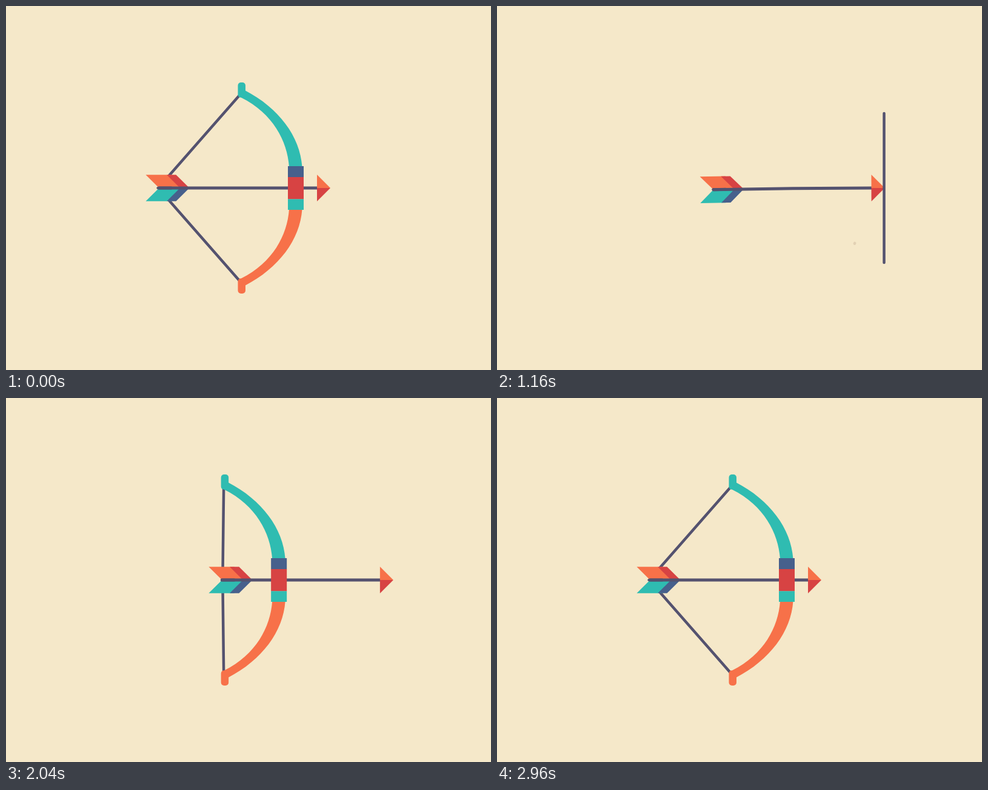
An HTML page with a canvas for the animation above (3 s loop, 800x600 px).

```html
<!DOCTYPE html>
<html lang="en">
<head>
<meta charset="utf-8">
<title>Bow and arrow</title>
<style>
html, body { margin: 0; width: 100%; height: 100%; overflow: hidden; background: #f5e8c9; }
canvas { display: block; }
</style>
</head>
<body>
<canvas id="stage" width="800" height="600"></canvas>
<script>
const ctx = document.getElementById('stage').getContext('2d');
const LOOP = 3000, MID = 300, IMPACT = 560, FLIGHT = 104.5;
const BG = '#f5e8c9', INK = '#54526f', TEAL = '#2fbcb1', ORANGE = '#f77149',
      RED = '#d74343', BLUE = '#47608c', SPARK = '#e2d1b4';

const clamp = v => Math.min(1, Math.max(0, v));
const ramp = (t, from, to) => clamp((t - from) / (to - from));

// Cubic bezier easing (.33, 0, .21, 1)
function ease(x) {
  let lo = 0, hi = 1;
  for (let i = 0; i < 24; i++) {
    const s = (lo + hi) / 2, r = 1 - s;
    if (3 * s * r * r * .33 + 3 * s * s * r * .21 + s * s * s < x) lo = s; else hi = s;
  }
  return lo * lo * (3 - 2 * lo);
}

function line(color, width, ...pts) {
  ctx.beginPath();
  pts.forEach(([x, y]) => ctx.lineTo(x, y));
  ctx.strokeStyle = color;
  ctx.lineWidth = width;
  ctx.lineCap = 'round';
  ctx.stroke();
}

function poly(color, ...pts) {
  ctx.beginPath();
  pts.forEach(([x, y]) => ctx.lineTo(x, y));
  ctx.fillStyle = color;
  ctx.fill();
}

function placed(x, y, angle, draw) {
  ctx.save();
  ctx.translate(x, y);
  ctx.rotate(angle);
  draw();
  ctx.restore();
}

function drawArrow(dx, bend) {
  placed(dx, 0, 0, () => {
    const nock = [252.5, MID + bend];
    placed(...nock, -bend * .0062, () => {
      for (const [side, base, tip] of [[-1, ORANGE, RED], [1, TEAL, BLUE]]) {
        const y = side * 21.8;
        poly(base, [-22, y], [20, y], [40, 0], [0, 0]);
        poly(tip, [12.7, y], [28, y], [50, 0], [34.5, 0]);
      }
      line(INK, 5, [0, 0], [20, -20 * bend * .0062 * .1]);
    });
    ctx.beginPath();
    ctx.moveTo(...nock);
    ctx.quadraticCurveTo(383, MID + bend * .12, 514, MID);
    ctx.lineWidth = 5;
    ctx.strokeStyle = INK;
    ctx.stroke();
    placed(535, MID, -bend * .001, () => {
      poly(ORANGE, [-22, -22], [0, 0], [-22, 0]);
      poly(RED, [-22, 22], [0, 0], [-22, 0]);
    });
  });
}

function drawLimb(color) {
  ctx.fillStyle = color;
  ctx.beginPath();
  ctx.roundRect(382.5, 126, 12.5, 25, 5);
  ctx.fill();
  ctx.beginPath();
  ctx.moveTo(394, 139);
  ctx.bezierCurveTo(450, 168, 485, 215, 488.5, 265);
  ctx.lineTo(467, 265);
  ctx.bezierCurveTo(464, 222, 440, 177, 388, 151);
  ctx.fill();
}

function drawBow(dx, dy) {
  placed(dx, dy, 0, () => {
    drawLimb(TEAL);
    ctx.save();
    ctx.translate(0, 2 * MID);
    ctx.scale(1, -1);
    drawLimb(ORANGE);
    ctx.restore();
    for (const [color, y, h] of [[BLUE, 264, 18.5], [RED, 282, 36.5], [TEAL, 318.3, 17.7]]) {
      ctx.fillStyle = color;
      ctx.fillRect(465, y, 26, h);
    }
  });
}

function drawSparks(t) {
  const age = t - IMPACT;
  if (age <= 0) return;
  const far = 105 * (1 - Math.exp(-age / 140));
  const near = 105 * (1 - Math.exp(-Math.max(0, age - 35) / 148));
  for (const [x, y, end] of [[-.69, -.723, 1150], [-.465, .885, 1185]]) {
    if (t < end) line(SPARK, 4.5, [638 + x * near, MID + y * near], [638 + x * far, MID + y * far]);
  }
}

function drawWall(t) {
  const x = 638.5 + 3 * Math.max(0, 545 - t);
  const fall = ramp(t, 1240, 1760) ** 2;
  const top = 177 + 338 * fall, bottom = 423 + 76 * fall;
  if (top < bottom) line(INK, 4.5, [x, top], [x, bottom]);
}

function draw(t) {
  ctx.fillStyle = BG;
  ctx.fillRect(0, 0, 800, 600);

  const scroll = 3.2 * (t - 200);
  if (t > 20 && t < IMPACT) {
    line('#e8d6bc', 5, [300 - scroll, 220], [602 - scroll, 220]);
    line('#e6d7b6', 5, [714 - scroll, 400], [1016 - scroll, 400]);
  }

  const leaving = t < 900;
  const pull = leaving ? 1 - ramp(t, 20, 80) : ease(ramp(t, 2000, 2960));
  const shift = leaving ? -3.2 * Math.max(0, t - 30) : 0;
  const rise = leaving ? 0 : 600 * (1 - ease(ramp(t, 960, 2000)));
  const bowX = shift - 28 * (1 - pull);

  line(INK, 4.5, [387 + bowX, 145 + rise], [358 - 107 * pull + shift, MID + rise],
    [387 + bowX, 455 + rise]);

  const wobbling = t > IMPACT && t < 1600;
  const bend = wobbling
    ? 21 * Math.exp(-.00425 * (t - 680)) * Math.cos(2 * Math.PI * (t - 680) / 160) : 0;
  drawSparks(t);
  drawArrow(FLIGHT * (t < 2000 ? ramp(t, 20, 545) : 1 - pull), bend);
  drawBow(bowX, rise);
  drawWall(t);
}

const start = performance.now();
function tick() {
  draw((performance.now() - start) % LOOP);
  requestAnimationFrame(tick);
}
tick();
</script>
</body>
</html>
```
